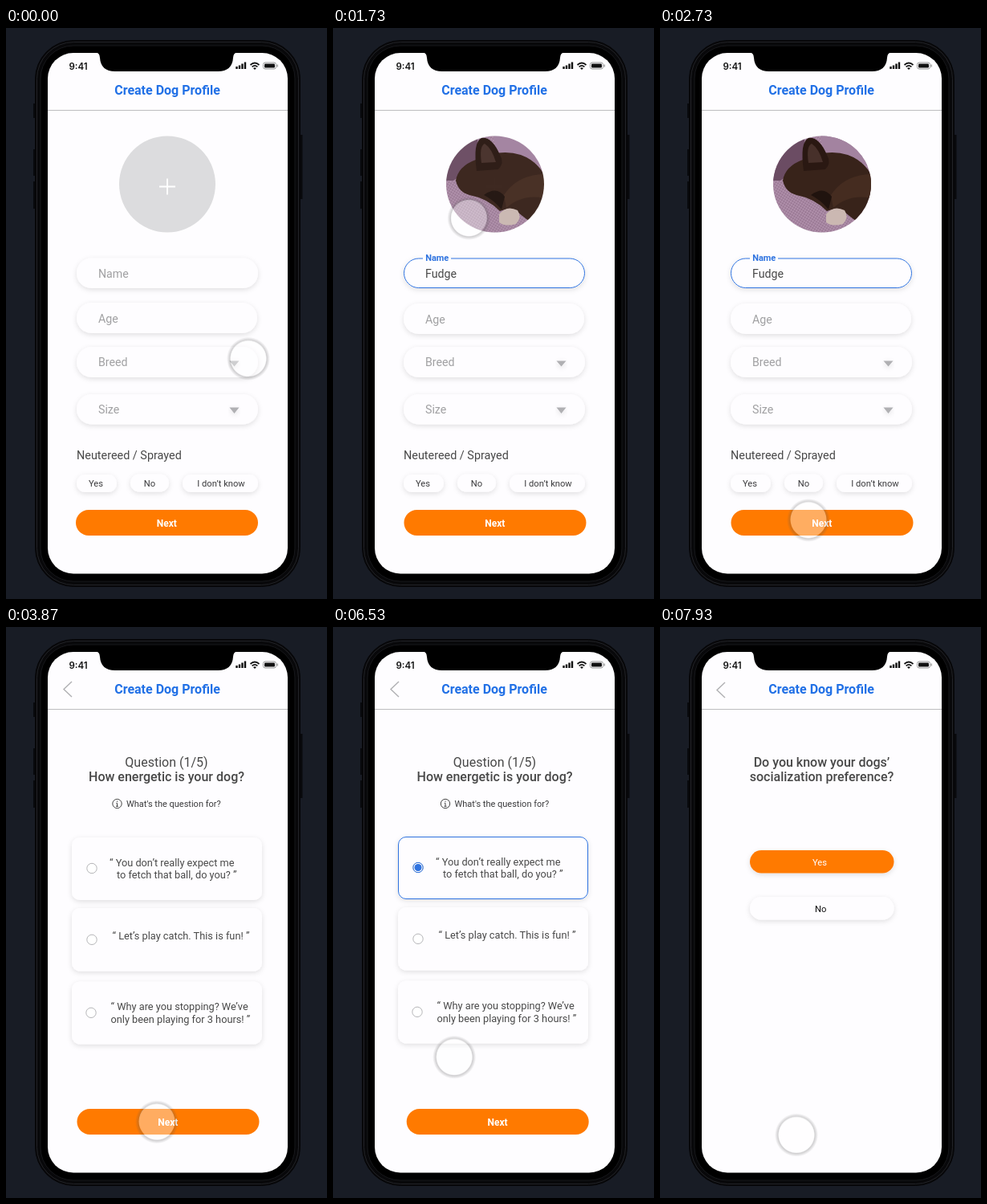
These frames come from a looping animation (400 px wide and 711 px high, 8000 ms). An HTML page:

```html
<!DOCTYPE html>
<html lang="en">
<head>
<meta charset="utf-8">
<title>Create Dog Profile</title>
<style>
  html, body { margin: 0; height: 100%; overflow: hidden; background: #181c25; }
  svg { display: block; width: 100vw; height: 100vh; }
  text { font: 14.2px Roboto, sans-serif; fill: #484848; white-space: pre; }
  .hint text { fill: #a0a0a2; }
  .mid { text-anchor: middle; }
  .title { font-size: 16px; font-weight: 700; fill: #2170e6; }
  .q { font-size: 16px; }
  .ask { font-size: 16px; font-weight: 500; }
  .small { font-size: 11.2px; fill: #3a3a3c; }
  .answer { font-size: 12.75px; }
  .next { font-size: 12px; font-weight: 700; fill: #fff; }
  .clock { font: 600 11.5px Inter, sans-serif; fill: #111; }
  .card { fill: #fefdff; filter: url(#shadow); }
  .orange { fill: #ff7a00; }
  .line { fill: none; stroke: #2f73e0; }
  .radio { fill: #fff; stroke: #b5b5b8; }
  .back { fill: none; stroke: #b0b0b3; stroke-width: 1.4; }
</style>
</head>
<body>
<svg viewBox="0 0 400 711" preserveAspectRatio="none">
  <defs>
    <filter id="shadow" x="-10%" y="-30%" width="120%" height="180%">
      <feDropShadow dx="0" dy="2" stdDeviation="3.2" flood-color="#000" flood-opacity=".12"/>
    </filter>
    <radialGradient id="halo">
      <stop offset=".8" stop-color="#555" stop-opacity="0"/>
      <stop offset=".85" stop-color="#555" stop-opacity=".27"/>
      <stop offset="1" stop-color="#555" stop-opacity="0"/>
    </radialGradient>
    <pattern id="wool" width="3" height="3" patternUnits="userSpaceOnUse" patternTransform="rotate(32)">
      <rect width="3" height="3" fill="#a584a0"/>
      <circle cx=".8" cy=".8" r=".7" fill="#c0a2bb"/>
      <circle cx="2.300" cy="2.200" r=".6" fill="#86667f"/>
    </pattern>
    <clipPath id="round"><ellipse cx="202" cy="194.500" rx="61" ry="60"/></clipPath>
  </defs>

  <!-- phone -->
  <rect width="400" height="711" fill="#181c25"/>
  <path d="M35.5 94v18M35.5 151v33M35.5 191v34M368 133v80" stroke="#08090c" stroke-width="3"/>
  <rect x="36.5" y="15.5" width="330" height="680" rx="48" fill="#08080a" stroke="#060608"/>
  <rect x="38.5" y="17.5" width="326" height="676" rx="46" fill="none" stroke="#222327"/>
  <rect x="43" y="22" width="317" height="667" rx="41" fill="#000" stroke="#17181b"/>
  <rect x="52" y="31" width="299" height="648.5" rx="32" fill="#fefdff"/>
  <path d="M111 30Q117 31 117 37Q118 54 136 54H264Q282 54 283 37Q283 31 289 30Z" fill="#000"/>
  <text class="clock mid" x="90" y="51.5">9:41</text>
  <path d="M287.5 48v3M291 46.500v4.500M294.500 44.500v6.500M298 42.500v8.500" stroke="#111" stroke-width="2.4"/>
  <path d="M304.500 46Q310 41 315.500 46M306.600 48.300Q310 45.300 313.400 48.300" fill="none" stroke="#111" stroke-width="1.7"/>
  <path d="M308 50Q310 48.500 312 50L310 52Z" fill="#111"/>
  <rect x="320.500" y="43" width="16" height="8" rx="2.500" fill="none" stroke="#999"/>
  <rect x="322" y="44.500" width="13" height="5" rx="1.200" fill="#111"/>
  <path d="M338.300 45.500v3" stroke="#999" stroke-width="1.300"/>
  <text class="title mid" x="201" y="83">Create Dog Profile</text>
  <path d="M52 102.500H351" stroke="#bdbdbf"/>

  <!-- profile form -->
  <g id="form">
    <circle cx="201" cy="194.500" r="60" fill="#dcdcde"/>
    <path d="M191 197.500h20M201 187.500v20" stroke="#fff" stroke-width="1.800"/>
    <g id="photo" clip-path="url(#round)">
      <rect x="140" y="133" width="124" height="124" fill="url(#wool)"/>
      <path d="M140 133H180V170L150 190H140Z" fill="#6b4c63"/>
      <path d="M200 133H264V176Q236 152 205 160Z" fill="#a383a0"/>
      <path d="M153 190Q156 172 178 164Q208 150 234 158Q256 166 266 188V246Q250 246 236 234Q222 222 208 228Q192 212 170 208Q156 204 153 190Z" fill="#38231a"/>
      <path d="M179 178Q174 142 185 137Q198 135 208 158Q214 168 206 176Z" fill="#2a1812"/>
      <path d="M185 168Q182 147 189 144Q198 150 203 167Z" fill="#47302a"/>
      <path d="M213 208Q230 182 264 182V212Q236 206 216 224Z" fill="#452c20"/>
      <path d="M188 208Q204 196 214 210L210 226Q200 214 188 208Z" fill="#20130e"/>
      <path d="M207 232Q216 220 230 227Q236 236 228 244Q214 248 207 242Z" fill="#cbb8b2"/>
    </g>

    <g class="card">
      <rect x="88" y="286.500" width="226" height="37.500" rx="18.750"/>
      <rect id="age" x="88" y="342" width="225" height="38" rx="19"/>
      <rect x="88" y="397" width="226" height="38" rx="19"/>
      <rect x="88" y="456" width="226" height="37.500" rx="18.750"/>
    </g>
    <g class="hint">
      <text id="nameHint" x="115" y="310.500">Name</text>
      <text id="ageHint" x="115" y="367">Age</text>
      <text x="115" y="421">Breed</text>
      <text x="115" y="480">Size</text>
    </g>
    <path d="M278.500 414.500h12l-6 7zM278.500 472.500h12l-6 7.500z" fill="#b0b0b3" filter="url(#shadow)"/>
    <g id="named">
      <rect class="line" x="88.500" y="287" width="225" height="36.500" rx="18.250"/>
      <path d="M112 287h35" stroke="#fff" stroke-width="3"/>
      <text class="mid" x="129.700" y="290" style="font-size:11px;font-weight:700;fill:#2f73e0">Name</text>
      <text x="115" y="310.500">Fudge</text>
    </g>

    <text x="88" y="537" style="font-size:14.400px">Neutereed / Sprayed</text>
    <g class="card">
      <rect x="88" y="556" width="50" height="22" rx="11"/>
      <rect x="155" y="555.500" width="48" height="22" rx="11"/>
      <rect x="220" y="556" width="94" height="22" rx="11"/>
    </g>
    <text class="small mid" x="112" y="571">Yes</text>
    <text class="small mid" x="179" y="570.500">No</text>
    <text class="small mid" x="268" y="571">I don’t know</text>
  </g>

  <path id="back" class="back" d="M82 68L72 77.500L82 87"/>

  <!-- question -->
  <g id="quiz">
    <g id="ask">
      <text class="q mid" x="200" y="174">Question (1/5)</text>
      <text class="ask mid" x="200" y="192">How energetic is your dog?</text>
      <circle cx="138.500" cy="220" r="5.700" fill="none" stroke="#444"/>
      <path d="M138.500 216.500v1.300M137.300 219.300h1.200v4M137 223.300h3" fill="none" stroke="#444"/>
      <text class="small" x="150" y="224" style="font-size:11px">What's the question for?</text>
    </g>
    <g id="cards">
      <g class="card">
        <rect x="82" y="262" width="237" height="78" rx="10"/>
        <rect x="82" y="350" width="237" height="78.500" rx="10"/>
        <rect x="82" y="441.500" width="237" height="78" rx="10"/>
      </g>
      <circle class="radio" cx="107" cy="300.500" r="6.200"/>
      <circle class="radio" cx="107" cy="389.300" r="6.200"/>
      <circle class="radio" cx="106" cy="480.300" r="6.200"/>
      <text class="answer" x="129" y="297.500">“ You don’t really expect me</text>
      <text class="answer" x="138" y="312.500">to fetch that ball, do you? ”</text>
      <text class="answer" x="132.500" y="389">“ Let’s play catch. This is fun! ”</text>
      <text class="answer" x="130.500" y="477">“ Why are you stopping? We’ve</text>
      <text class="answer" x="130.500" y="492.500">only been playing for 3 hours! ”</text>
      <g id="picked">
        <rect class="line" x="82.500" y="262.500" width="236" height="77" rx="9.500"/>
        <circle class="line" cx="107" cy="300.500" r="6.200"/>
        <circle cx="107" cy="300.500" r="4.500" fill="#2f73e0"/>
      </g>
    </g>
  </g>

  <g id="next">
    <rect class="orange" x="87" y="600" width="227" height="32" rx="16"/>
    <text class="next mid" x="200.300" y="620.500">Next</text>
  </g>

  <!-- social preference -->
  <g id="social">
    <text class="ask mid" x="201.500" y="174">Do you know your dogs’</text>
    <text class="ask mid" x="201.500" y="192">socialization preference?</text>
    <g class="card">
      <rect class="orange" x="112" y="278" width="179.500" height="28.500" rx="14.250"/>
      <rect x="112" y="336" width="179.500" height="28.500" rx="14.250"/>
    </g>
    <text class="small mid" x="199" y="297" style="fill:#fff">Yes</text>
    <text class="small mid" x="200.300" y="355" style="fill:#111">No</text>
  </g>

  <g id="cursor">
    <circle cy=".8" r="27" fill="url(#halo)"/>
    <circle r="22.500" fill="#fff" fill-opacity=".38"/>
  </g>
</svg>
<script>
  const LOOP = 8000;
  const $ = id => document.getElementById(id);
  const fade = (id, o) => $(id).setAttribute('opacity', o);
  const move = (id, x, y) => $(id).setAttribute('transform', `translate(${x} ${y})`);

  const glide = (t, start, dur = 850) => {
    const p = Math.min(1, Math.max(0, (t - start) / dur));
    return 1 - (1 - p) ** 2.4;
  };
  const spring = (t, start) => {
    const s = Math.max(0, t - start) / 1000;
    return 1 - Math.exp(-4.47 * s) * (Math.cos(6.28 * s) + .712 * Math.sin(6.28 * s));
  };

  const stops = [[302, 411], [150, 306], [170, 234], [185, 613], [188, 615.5], [142, 302], [155, 632], [170, 631.5]];

  function draw(t) {
    const name = glide(t, 220), photo = glide(t, 1080), toNext = glide(t, 1950),
          quiz = glide(t, 2820), toCard = glide(t, 4480), pick = glide(t, 5610, 270),
          drop = spring(t, 6300), social = glide(t, 7150, 780);

    fade('named', name);
    fade('nameHint', 1 - name);
    move('age', 0, name);
    move('ageHint', 0, name);
    fade('photo', photo);
    fade('form', 1 - quiz);
    fade('back', quiz);
    move('back', -social, social);
    fade('quiz', quiz * (1 - social));
    fade('picked', pick);
    move('ask', 1.5 * pick, 0);
    move('cards', -pick, -pick);
    fade('next', 1 - social);
    move('next', name + .5 * photo + 3.2 * pick, 0);
    fade('social', social);

    const steps = [name, photo, toNext, quiz, toCard, drop, social];
    const at = axis => steps.reduce((v, p, i) => v + p * (stops[i + 1][axis] - stops[i][axis]), stops[0][axis]);
    move('cursor', at(0), at(1));
  }

  const begin = performance.now();
  function tick() {
    draw((performance.now() - begin) % LOOP);
    requestAnimationFrame(tick);
  }
  tick();
</script>
</body>
</html>
```
